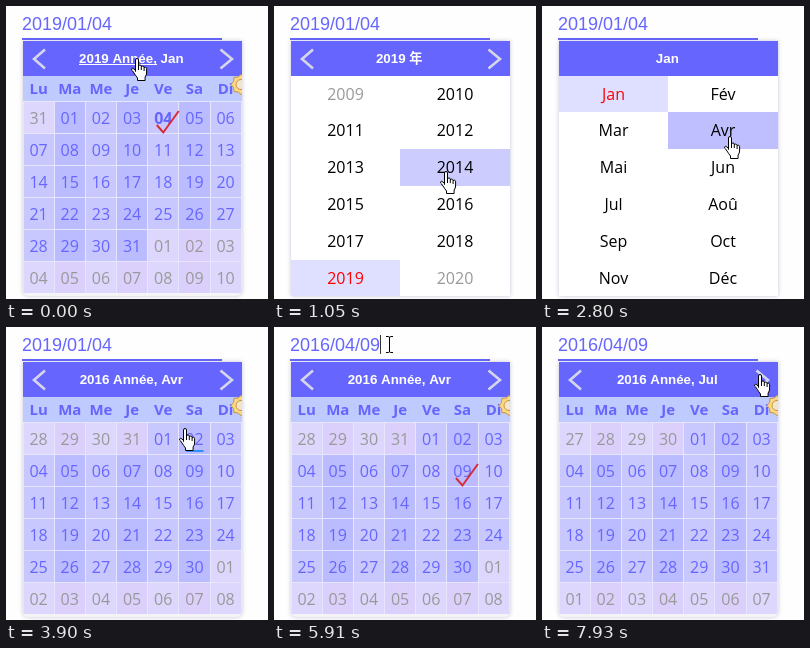
An HTML page with a canvas that plays this animation: 262 px wide and 293 px high, repeating every 8 s.

```html
<!DOCTYPE html>
<html lang="fr">
<head>
<meta charset="utf-8">
<title>Date picker</title>
<style>
html, body { margin: 0; width: 100%; height: 100%; overflow: hidden; background: #fefefe; }
canvas { display: block; width: 262px; height: 293px; }
</style>
</head>
<body>
<canvas id="stage"></canvas>
<script>
const W = 262, H = 293, LOOP = 8000;
const BLUE = '#6666ff';
const UI = '"Open Sans", "Noto Sans", sans-serif';
const ARIAL = '"Liberation Sans", "Noto Sans CJK SC", "Noto Sans CJK JP", sans-serif';
const MONTHS = ['Jan', 'Fév', 'Mar', 'Avr', 'Mai', 'Jun', 'Jul', 'Aoû', 'Sep', 'Oct', 'Nov', 'Déc'];
const WEEKDAYS = ['Lu', 'Ma', 'Me', 'Je', 'Ve', 'Sa', 'Di'];
const YEARS = Array.from({ length: 12 }, (_, i) => String(2009 + i));
const LEFT = 17, RIGHT = 236, MIDDLE = 126, HEAD = 35, BODY = 70, GRID = 96;
const COL = 31.17, ROW = 32, LIST_ROW = 36.8;

const HAND = new Path2D('M4.5 13.5V2q0-1.5 1.5-1.5T7.5 2V8q0-1 1.4-1t1.4 1.2V9q.1-1 1.4-.9t1.4 1.3V10' +
  'q.2-.9 1.3-.8t1.2 1.5V15q0 2-1.5 4v3.5H6.5V20Q4.5 17.5 3 15T.6 12q-.3-1.5 1-1.7 1.5.2 2.9 2.4Z');
const KNUCKLES = new Path2D('M7.5 8v4M10.3 9v3M13.1 10v3');
const ARROW = new Path2D('M.5 .5V16.5L4 13l3 6.5 2.4-1L6.5 12H11.7Z');
const IBEAM = new Path2D('M0 .5H2.5Q3.5 .5 3.5 2V15q0 1.5-1 1.5H0M7 .5H4.5Q3.5 .5 3.5 2V15q0 1.5 1 1.5H7');

// Pointer stops: start time, left, top, shape
const POINTER = [
  [0, 125, 52, 'hand'], [120, 124, 52, 'hand'], [390, 128, 56, 'hand'], [510, 140, 118, 'hand'],
  [630, 150, 187, 'hand'], [780, 160, 182, 'hand'], [900, 165, 172, 'hand'], [1050, 166, 165, 'hand'],
  [1170, 167, 169, 'hand'], [1290, 168, 174, 'hand'], [1410, 169, 181, 'hand'], [1530, 171, 182, 'hand'],
  [1650, 172, 181, 'hand'], [1960, 172, 179, 'hand'], [2110, 170, 167, 'hand'], [2260, 177, 159, 'hand'],
  [2410, 179, 150, 'hand'], [2530, 181, 140, 'hand'], [2650, 183, 132, 'hand'], [2800, 182, 130, 'hand'],
  [3470, 181, 132, 'hand'], [3620, 173, 104, 'hand'], [3900, 173, 101, 'hand'], [4020, 165, 106, 'hand'],
  [4140, 157, 114, 'hand'], [4260, 152, 124, 'hand'], [4410, 155, 138, 'hand'], [4530, 162, 164, 'hand'],
  [4680, 175, 155, 'hand'], [4800, 182, 144, 'hand'], [4950, 187, 144, 'arrow'], [5070, 172, 133, 'arrow'],
  [5220, 158, 92, 'arrow'], [5370, 138, 78, 'arrow'], [5520, 125, 50, 'arrow'], [5640, 117, 20, 'ibeam'],
  [5760, 112, 9, 'ibeam'], [6030, 130, 28, 'arrow'], [6150, 152, 46, 'arrow'], [6270, 177, 64, 'hand'],
  [6420, 202, 50, 'hand'], [6570, 208, 48, 'hand'], [6690, 212, 47, 'hand']
];
// Popup states: start time, view, year, month
const VIEWS = [
  [0, 'days', 2019, 0], [390, 'years', 2019, 0], [1960, 'months', 2016, 0], [3230, 'days', 2016, 3],
  [4950, 'closed', 2016, 3], [5910, 'days', 2016, 3], [6940, 'days', 2016, 4],
  [7370, 'days', 2016, 5], [7930, 'days', 2016, 6]
];
const at = (track, t) => track.findLast(stop => stop[0] <= t);
const sameDay = (date, y, m, d) => +date === +new Date(y, m, d);

const canvas = document.getElementById('stage');
const ctx = canvas.getContext('2d');
const scale = window.devicePixelRatio || 1;
canvas.width = W * scale;
canvas.height = H * scale;

function rect(x, y, w, h, color) {
  ctx.fillStyle = color;
  ctx.fillRect(x, y, w, h);
}

function label(text, x, y, font, color, align = 'center') {
  ctx.font = font;
  ctx.fillStyle = color;
  ctx.textAlign = align;
  ctx.fillText(text, x, y);
}

function line(points, color, width) {
  ctx.beginPath();
  points.forEach(p => ctx.lineTo(...p));
  ctx.strokeStyle = color;
  ctx.lineWidth = width;
  ctx.stroke();
}

function field(t) {
  label(t < 4950 ? '2019/01/04' : '2016/04/09', 16, 24, '18px ' + ARIAL, BLUE, 'left');
  rect(16, 32, 200, 2, BLUE);
  const caret = (t >= 120 && t < 240) || (t >= 5760 && t < 6270);
  if (caret) rect(106, 8, 1, 19, '#333');
}

function panel(color, radius) {
  ctx.save();
  ctx.shadowColor = 'rgba(90,90,140,.35)';
  ctx.shadowBlur = 4 * scale;
  ctx.fillStyle = color;
  ctx.beginPath();
  ctx.roundRect(LEFT, HEAD, RIGHT - LEFT, 255, [0, 0, radius, radius]);
  ctx.fill();
  ctx.restore();
}

function header(text, arrows) {
  rect(LEFT, HEAD, RIGHT - LEFT, BODY - HEAD, BLUE);
  label(text, 125.3, 57, 'bold 13.333px ' + ARIAL, '#fff');
  if (!arrows) return;
  line([[39, 43.5], [28, 53], [39, 62.5]], '#d6d6ea', 2.6);
  line([[214.5, 43.5], [226, 53], [214.5, 62.5]], '#d6d6ea', 2.6);
}

function sun() {
  ctx.save();
  ctx.beginPath();
  ctx.rect(222, 66, RIGHT - 222, 25);
  ctx.clip();
  ctx.beginPath();
  for (let i = 0; i < 16; i++) {
    const a = i * Math.PI / 8, r = i % 2 ? 8 : 10;
    ctx.lineTo(235 + r * Math.cos(a), 78.5 + r * Math.sin(a));
  }
  ctx.closePath();
  ctx.fillStyle = '#ffd980';
  ctx.strokeStyle = '#c1944a';
  ctx.lineWidth = 1;
  ctx.fill();
  ctx.stroke();
  ctx.beginPath();
  ctx.arc(235, 78.5, 5, 0, 7);
  ctx.fillStyle = '#f3e6c8';
  ctx.fill();
  ctx.stroke();
  ctx.restore();
}

function days(t, year, month, tip) {
  panel('#f4f4f7', 5);
  header(`${year} Année, ${MONTHS[month]}`, true);
  if (t < 390) rect(73, 58, 78, 1, '#fff');
  rect(LEFT, BODY, RIGHT - LEFT, GRID - BODY, '#bfcaff');
  WEEKDAYS.forEach((d, i) => label(d, LEFT + COL * (i + .5), 88, 'bold 15px ' + UI, BLUE));
  sun();

  rect(LEFT, GRID - 1, RIGHT - LEFT, ROW * 6, '#e6e6ff');
  const lead = (new Date(year, month, 1).getDay() + 6) % 7;
  let picked;
  for (let i = 0; i < 42; i++) {
    const date = new Date(year, month, 1 - lead + i);
    const inside = date.getMonth() === month, odd = i % 7 % 2;
    const x = LEFT + COL * (i % 7), y = GRID + ROW * Math.floor(i / 7);
    const cx = x + COL / 2, cy = y + ROW / 2;
    const cellLeft = Math.floor(x) + 1;
    rect(cellLeft, y, Math.floor(x + COL) - cellLeft, ROW - 1,
      inside ? (odd ? '#bbbbff' : '#c8c8ff') : (odd ? '#dbd0fb' : '#ddd6fd'));
    const weight = sameDay(date, 2019, 0, 4) ? 'bold ' : '';
    label(String(date.getDate()).padStart(2, '0'), cx, cy + 6, weight + '16px ' + UI, inside ? BLUE : '#999');
    const hovered = tip && tip[0] >= x && tip[0] < x + COL && tip[1] >= y && tip[1] < y + ROW;
    if (hovered && t >= 3620) rect(cx - 8, cy + 11, 17, 2, '#2f8fff');
    if (t < 4950 ? sameDay(date, 2019, 0, 4) : sameDay(date, 2016, 3, 9)) picked = [cx, cy];
  }
  if (picked) {
    const [x, y] = picked;
    line([[x - 6.5, y + 7], [x, y + 14.5], [x + 15.5, y - 7]], '#d92b36', 2);
  }
}

function list(items, title, arrows, selected, hovered, hoverColor, muted) {
  panel('#fff', 0);
  header(title, arrows);
  items.forEach((item, i) => {
    const row = Math.floor(i / 2), [x, end] = i % 2 ? [MIDDLE, RIGHT] : [LEFT, MIDDLE];
    const top = Math.floor(BODY + LIST_ROW * row);
    const h = Math.floor(BODY + LIST_ROW * (row + 1)) - top;
    if (i === selected) rect(x, top, end - x, h, '#dfdfff');
    if (i === hovered) rect(x, top, end - x, h, hoverColor);
    const color = i === selected ? '#f00' : muted.includes(i) ? '#999' : '#000';
    label(item, (x + end) / 2, top + 24, '16px ' + UI, color);
  });
}

function pointer(x, y, shape) {
  ctx.save();
  ctx.translate(x, y);
  ctx.lineWidth = 1;
  ctx.strokeStyle = '#000';
  ctx.fillStyle = '#fff';
  const path = { hand: HAND, arrow: ARROW, ibeam: IBEAM }[shape];
  if (shape !== 'ibeam') ctx.fill(path);
  ctx.stroke(path);
  if (shape === 'hand') ctx.stroke(KNUCKLES);
  ctx.restore();
}

function draw(t) {
  ctx.setTransform(scale, 0, 0, scale, 0, 0);
  rect(0, 0, W, H, '#fefefe');
  const [, x, y, shape] = at(POINTER, t);
  const [, view, year, month] = at(VIEWS, t);
  const tip = shape === 'hand' ? [x + 5, y] : null;
  const row = Math.floor((y - BODY) / LIST_ROW);
  const hovered = row >= 0 ? row * 2 + (x + 5 >= MIDDLE ? 1 : 0) : -1;

  field(t);
  if (view === 'days') days(t, year, month, tip);
  if (view === 'years') list(YEARS, '2019 年', true, 10, hovered, '#ccccff', [0, 11]);
  if (view === 'months') list(MONTHS, 'Jan', false, 0, t < 2110 ? -1 : hovered, '#bfbfff', []);
  pointer(x, y, shape);
}

const start = performance.now();
function frame() {
  draw((performance.now() - start) % LOOP);
  requestAnimationFrame(frame);
}
frame();
</script>
</body>
</html>
```
